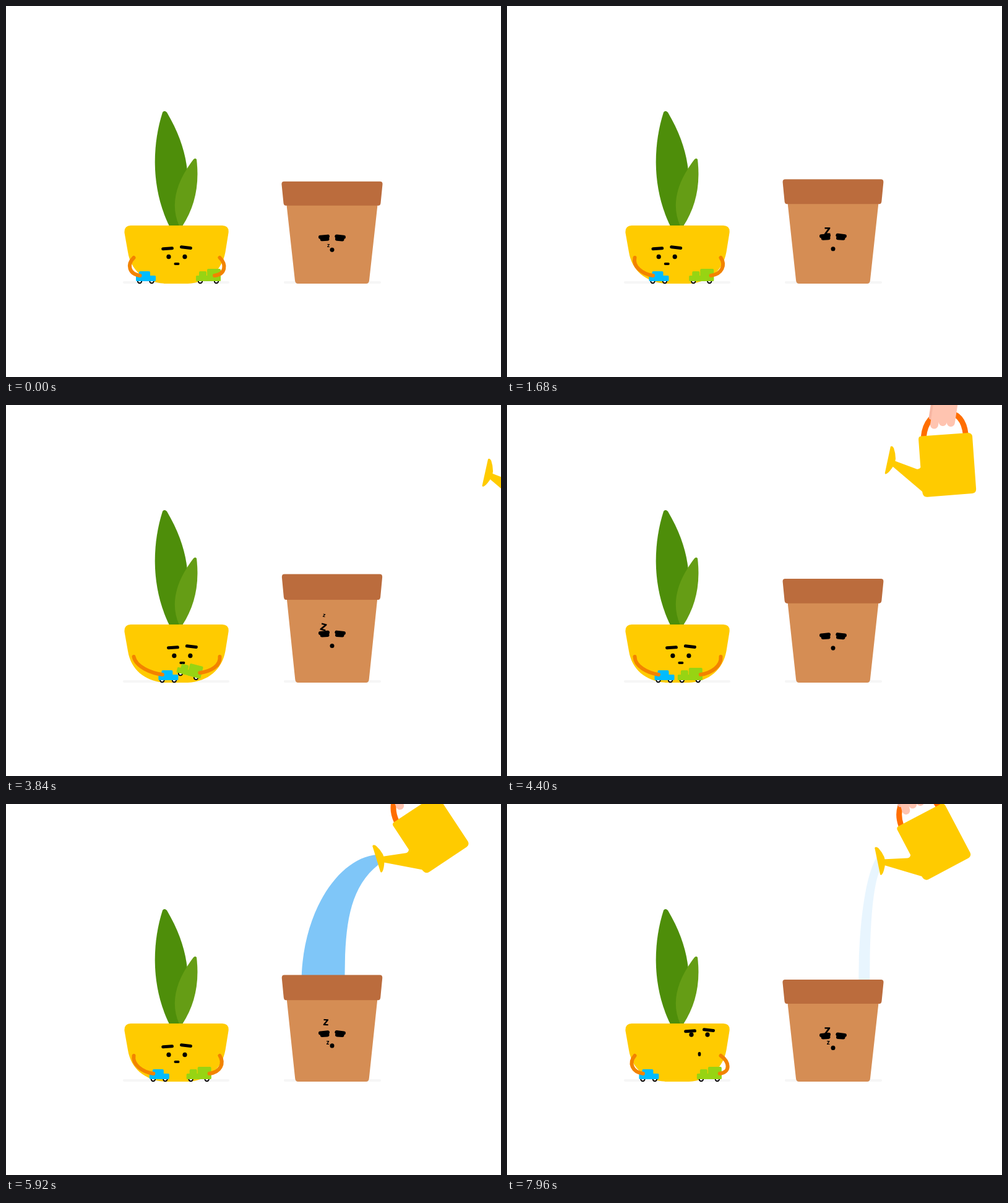
These frames come from a looping animation (800x600 px, 8 s). An HTML page:

```html
<!DOCTYPE html>
<html lang="en">
<head>
<meta charset="utf-8">
<title>Two flower pots</title>
<style>
html, body { margin: 0; width: 100%; height: 100%; overflow: hidden; background: #fff; }
svg { display: block; width: 100%; height: 100%; }
.ink { fill: none; stroke: #000; stroke-linecap: round; }
.arm { fill: none; stroke: #f28300; stroke-width: 6; stroke-linecap: round; }
.wheel { fill: #fff; stroke: #000; stroke-width: 1.9; }
.zzz { font: 700 20px "Open Sans", sans-serif; text-anchor: middle; }
</style>
</head>
<body>
<svg viewBox="0 0 800 600">
  <path d="M191 447H359M451 447H604" stroke="#f6f6f6" stroke-width="4" stroke-linecap="round"/>

  <path fill="#4e8e0a" d="M264 356C234 295 236 225 253 172Q256 168 260 172C300 240 300 295 284 356Z"/>
  <path fill="#659d15" d="M303 248Q306 245 308 248C313 290 305 325 285 356H280C264 320 276 283 303 248Z"/>
  <path fill="#ffcb00" d="M201.5 355H349.5Q361 355.5 359.5 367L354.5 398C349 428 327 447 294 449H258C224 447 202 428 197 398L191.5 367Q190.5 355.5 201.5 355Z"/>

  <path id="brows" class="ink" stroke-width="5" d="M253.7 392.8L268.5 391.8M283.5 389.7L298.5 391.5"/>
  <g id="eyes"><ellipse cx="263" cy="405.5" rx="3.6" ry="3.8"/><ellipse cx="289" cy="405.5" rx="3.6" ry="3.8"/></g>
  <rect id="mouth"/>

  <g id="car">
    <circle class="wheel" cx="6" cy="445" r="3.2"/><circle class="wheel" cx="25.5" cy="445" r="3.2"/>
    <rect x="5" y="429" width="18" height="10" rx="2" fill="#00bcff"/>
    <rect y="436" width="32" height="9" rx="1.5" fill="#00bcff"/>
  </g>
  <g id="truck" fill="#97d413">
    <circle class="wheel" cx="-13" r="3.2"/><circle class="wheel" cx="13" r="3.2"/>
    <rect x="-15" y="-16" width="12" height="10" rx="2"/>
    <rect x="-20" y="-9" width="40" height="9" rx="1.5"/>
    <rect x="-2" y="-20" width="22" height="20" rx="2"/>
  </g>
  <path id="armL" class="arm"/>
  <path id="armR" class="arm"/>

  <path id="water" fill="#7fc6f8"/>

  <g id="clay">
    <path fill="#d58d54" d="M453.5 322H600.5L587 444Q586.5 449 582 449H472Q467.5 449 467 444Z"/>
    <path fill="#bb6c3d" d="M449.5 284H604.5Q609 284 608.5 289L605.5 319Q605 323 602 323H452Q449 323 448.5 319L445.5 289Q445 284 449.5 284Z"/>
  </g>
  <g id="sleeper">
    <path class="ink" stroke-width="6" d="M508 374L520 372.8M510.7 377.5L519.5 377M534.3 372.6L546 374M535 377L543.5 377.6"/>
    <ellipse cx="527" cy="394.5" rx="3.5" ry="3.6"/>
  </g>
  <g id="snore"></g>

  <g id="can">
    <path fill="none" stroke="#ff6e00" stroke-width="9" d="M650.5 41C649 18 660 1 677 -3C700 -8 712 8 717 27"/>
    <g fill="none" stroke="#ffc4b0" stroke-linecap="round">
      <path stroke="#f7b6a2" stroke-width="8" d="M658 -40V8"/>
      <path stroke-width="13" d="M664.5 -45V19.5M677.5 -45V13M690.5 -45V12"/>
      <path stroke-width="30" d="M677 -90V-25"/>
    </g>
    <path fill="#ffcb00" d="M607 86L647 94.5Q651 95 653 91L643 47Q642 42 646 41L721 24Q726 23.5 728 28L747 112Q748 118 742 120L671 136.5Q664 138 661.5 129L607 95.5Z"/>
    <path fill="#ffcb00" d="M600 65Q602 62 605.5 66.5Q609.5 74 611 83Q611.5 92 607.5 99Q602.5 109 599 110Q597 110 597.5 107Z"/>
  </g>
</svg>
<script>
const LOOP = 8000;
const $ = id => document.getElementById(id);
const clamp = p => Math.min(1, Math.max(0, p));
const lerp = (a, b, p) => a + (b - a) * p;
const ease = p => (1 - Math.cos(Math.PI * clamp(p))) / 2;
const tween = (t, t0, t1, a, b) => lerp(a, b, ease((t - t0) / (t1 - t0)));
// rises from 0 to 1 and back once per period
const swell = (t, period) => Math.sin(Math.PI * t / period) ** 2;
const move = (id, value) => $(id).setAttribute("transform", value);

function setAll(el, attrs) {
  for (const name in attrs) el.setAttribute(name, attrs[name]);
}

function drawFace(t) {
  const look = ease((t - 6400) / 1560);
  const up = ease((t - 6440) / 1100);
  const watch = Math.min(t, 5000);
  const sway = -40 * Math.exp(-watch / 2560) * Math.sin(2 * Math.PI * watch / 5000);
  const dx = sway + 35 * look;
  move("eyes", `translate(${dx} ${-32.5 * look})`);
  move("brows", `translate(${dx} ${-25 * up})`);
  const width = lerp(9, 4.6, look), height = lerp(4, 7, look);
  setAll($("mouth"), {
    x: 276 + dx - width / 2, y: 417 - 12.5 * look - height / 2,
    width, height, rx: Math.min(width, height) / 2
  });
}

function drawToys(t) {
  const near = swell(t, 7800);
  const car = 210 + 22 * near + 14.5 * swell(t, 2520);
  move("car", `translate(${car} 0)`);
  const hx = car + 6.5, reach = hx - 216;
  $("armL").setAttribute("d",
    `M206.5 407C${195 + reach * .4} ${418 + reach * .15} ${hx - 18} 433.5 ${hx} 436`);

  // the truck hops when the toys meet
  const tilt = 15 * Math.cos(Math.PI / 2 * Math.min(1, Math.abs(t - 3840) / 500));
  const a = tilt * Math.PI / 180;
  const cx = 327 - 32.5 * near, cy = 445 - tilt / 2;
  move("truck", `translate(${cx} ${cy}) rotate(${tilt})`);
  const grip = tween(t, 0, 2500, 10, 17);
  const gx = cx + grip * Math.cos(a) + 9 * Math.sin(a);
  const gy = cy + grip * Math.sin(a) - 9 * Math.cos(a);
  const pull = 338 - gx;
  $("armR").setAttribute("d",
    `M345.5 407C${357 - pull * .4} ${418 + pull * .15} ${gx + 18} ${gy - 2.5} ${gx} ${gy}`);
}

// pairs of z, alternately far apart and close together
const zs = Array.from({ length: 8 }, (_, i) => {
  const pair = i >> 1;
  const el = document.createElementNS("http://www.w3.org/2000/svg", "text");
  setAll(el, { class: "zzz", y: 5.4 });
  el.textContent = "z";
  $("snore").append(el);
  return { el, born: 2450 * pair + (i % 2) * (pair % 2 ? 550 : 980) };
});

function drawSnore(t) {
  for (const { el, born } of zs) {
    const age = t - born, u = age / 1400;
    const on = u >= 0 && u < 1;
    el.setAttribute("visibility", on ? "visible" : "hidden");
    if (!on) continue;
    const x = 518.5 - 5 * u + 2.5 * Math.cos(2 * Math.PI * age / 330);
    const y = 388 - 48 * u;
    const size = 4.6 + 7 * Math.sin(Math.PI * u);
    el.setAttribute("transform",
      `translate(${x} ${y}) rotate(${Math.max(0, 518 - x) * 3}) scale(${size / 10.8})`);
  }
}

function drawSleeper(t) {
  const breath = Math.min(1, ((t + 130) % 2678) / 2250);
  const lift = 11 * swell(breath, 1);
  move("clay", `translate(527 449) scale(${1 - lift * .0005} ${1 + lift / 165}) translate(-527 -449)`);
  move("sleeper", `translate(0 ${-.48 * lift})`);
}

function drawCan(t) {
  const inX = tween(t, 3400, 4600, 250, 0);
  const inY = tween(t, 3400, 4600, 32, 0) + Math.max(0, t - 5000) * .0018;
  const angle = tween(t, 4260, 6430, 9, -25) + tween(t, 7170, 9340, 0, 34);
  move("can", `translate(${inX} ${inY}) rotate(${angle} 600 87)`);

  const rise = ease((t - 4350) / 830);
  const flow = rise * ease((8600 - t) / 1880);
  const width = 70 * rise * ease((8400 - t) / 1300);
  const out = 600 - 122.5 * flow, inn = out + width;
  const top = 81 + inY * .4, low = 98 + 14 * (1 - flow);
  setAll($("water"), {
    opacity: clamp(Math.min((t - 4400) / 820, (8140 - t) / 1000)),
    d: `M600 ${top}C${600 - 66 * flow} ${top + 24 - 18 * flow} ${out} 180 ${out} 290` +
       `H${inn}C${inn} 205 ${inn + 4} 138 602 ${low}Z`
  });
}

function frame(now) {
  const t = now % LOOP;
  drawFace(t);
  drawToys(t);
  drawSleeper(t);
  drawSnore(t);
  drawCan(t);
}

const start = performance.now();
(function tick() {
  frame(performance.now() - start);
  requestAnimationFrame(tick);
})();
</script>
</body>
</html>
```
